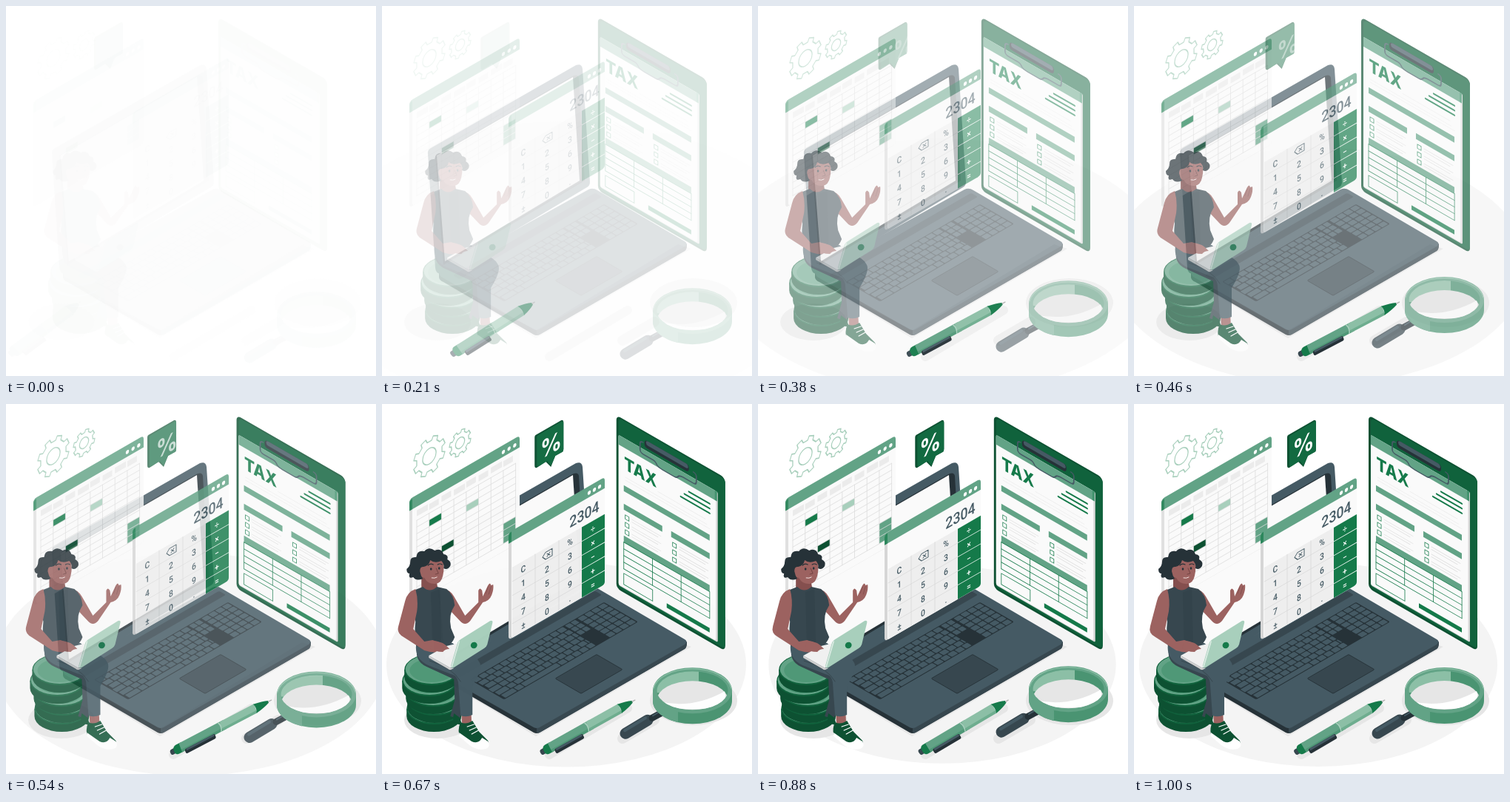
An HTML page for the animation above (1040 ms loop, 500 px wide and 500 px high).

```html
<!DOCTYPE html>
<html lang="en">
<head>
<meta charset="utf-8">
<title>Tax illustration</title>
<style>
html, body { margin: 0; width: 100%; height: 100%; overflow: hidden; background: #fff; }
svg { display: block; width: 100vw; height: 100vh; }
text { font-family: Roboto, "Liberation Sans", sans-serif; text-anchor: middle; }
.bold { font-family: Inter, "Liberation Sans", sans-serif; }
</style>
</head>
<body>
<svg id="stage" viewBox="0 0 500 500"></svg>
<script>
const GREEN = '#157a4a', PINE = '#10623c', DEEP = '#0d5132', MID = '#62a386', LIGHT = '#a8cfbc';
const SLATE = '#455a64', DARK = '#37474f', INK = '#263238', SKIN = '#9c6260';

// Markup helpers
const path = (d, fill, extra = '') => `<path d="${d}" fill="${fill}" ${extra}/>`;
const line = (d, color, w = 1) =>
  path(d, 'none', `stroke="${color}" stroke-width="${w}" stroke-linecap="round" stroke-linejoin="round"`);
const rect = (x, y, w, h, fill, r = 0, extra = '') =>
  `<rect x="${x}" y="${y}" width="${w}" height="${h}" rx="${r}" fill="${fill}" ${extra}/>`;
const oval = (x, y, rx, ry, fill, extra = '') =>
  `<ellipse cx="${x}" cy="${y}" rx="${rx}" ry="${ry}" fill="${fill}" ${extra}/>`;
const text = (x, y, s, size, fill, weight, slope) =>
  `<text class="${weight > 600 ? 'bold' : ''}" transform="matrix(.866 ${slope / 2} 0 1 ${x} ${y})" y="${size * .36}" font-size="${size}" font-weight="${weight}" fill="${fill}">${s}</text>`;
const plane = (x, y, slope, body) =>
  `<g transform="matrix(1 ${slope * .577} 0 1 ${x} ${y})">${body}</g>`;
const each = (n, f) => Array.from({ length: n }, (_, i) => f(i)).join('');

function gear(x, y, r, teeth, turn) {
  const pts = [];
  for (let i = 0; i < teeth; i++)
    for (const [a, k] of [[-.28, .8], [-.2, 1], [.2, 1], [.28, .8]]) {
      const q = (i + a) / teeth * 2 * Math.PI + turn;
      pts.push((r * k * Math.cos(q)).toFixed(1) + ' ' + (r * k * Math.sin(q)).toFixed(1));
    }
  return `<g transform="matrix(.866 -.5 0 1 ${x} ${y})">${line('M' + pts.join('L') + 'Z', LIGHT, 1.5)}
    ${oval(0, 0, r * .42, r * .42, 'none', `stroke="${LIGHT}" stroke-width="1.5"`)}</g>`;
}

function laptop() {
  const rows = each(6, r => {
    const y = 28 + r * 7.5;
    let x = 13 + r % 3, s = '';
    while (x < 136) {
      const w = r == 5 && x > 40 && x < 50 ? 48 : Math.min(x < 16 ? 8 + r * 1.6 : 8.4, 137 - x);
      s += rect(x, y, w, 6.4, SLATE, 1);
      x += w + 1.2;
    }
    if (r < 3) s += each(2, i => rect(139 + i * 7.5, y, 6.4, 6.4, SLATE, 1));
    return s + each(4, i => rect(156 + i * 9.2, y, 8, 6.4, SLATE, 1));
  });
  const deck = rect(8, 8, 192, 9, DARK, 2) + rect(12, 27, 181, 46, INK, 2) + rows +
    rect(71, 83, 56, 35, DARK, 1, `stroke="${INK}" stroke-width=".7"`);
  return path('M77 360L77 367Q78 371 83 373L205 444Q209 446 213 444L409 331Q412 329 412 322L290 255Z', INK) +
    path('M209 438L209 445L213 444L409 331Q412 329 412 321Z', DARK) +
    path('M79 359L279 248Q285 245 291 249L409 318Q414 321 409 325L213 437Q209 439 205 437L80 366Q76 362 79 359Z', SLATE) +
    `<g transform="matrix(1 -.58 1 .58 80 364)">${deck}</g>` +
    path('M62 200Q61 195 66 192L262 80Q270 77 271 85L281 238Q281 243 277 245L83 361Q73 364 72 354Z', SLATE) +
    path('M72 202L259 94Q265 92 266 97L274 236L83 350Z', INK) +
    path('M74 202L258 96L267 236L85 345Z', '#fafafa');
}

function sheet() {
  const colX = i => 9 + i * 16.7, rowY = i => 32.5 + i * 9;
  const cell = (c, r, n, fill) => rect(colX(c), rowY(r), 16.7, 9 * n, fill);
  return plane(38, 130, -1,
    rect(-1, 0, 149, 142, '#e0e0e0', 4) + rect(3, 2, 145, 140, '#fafafa', 3) +
    path('M-1 14V3Q-1 -2 4 -2H144Q148 -2 148 3V14Z', MID) + path('M-1 14V3Q-1 0 3 0V14Z', GREEN, 'opacity=".6"') +
    each(3, i => oval(126 + i * 7.7, 7.5, 2.2, 2.6, '#fff')) +
    each(8, i => rect(colX(i), 19 + i % 2, i % 3 ? 13 : 15, 8, '#ebebeb')) +
    cell(1, 1, 1, GREEN) + cell(4, 2, 1, LIGHT) + cell(2, 6, 1, DEEP) + cell(7, 8, 3, MID) +
    each(12, i => line(`M9 ${rowY(i)}H142.6`, '#dcdcdc', .7)) +
    each(9, i => line(`M${colX(i)} 32.5V131.5`, '#dcdcdc', .7)));
}

function calculator() {
  const keys = ['C', '', '%', '÷', 1, 2, 3, '×', 4, 5, 6, '−', 7, 8, 9, '+', '±', 0, '.', '='];
  const cols = [191, 223, 254, 285];
  return plane(171, 176, -1,
    rect(0, 0, 130, 143, '#d6d6d6', 4) + rect(4, 1, 126, 142, '#fafafa', 3) +
    path('M0 13V3Q0 -2 4 -2H126Q130 -2 130 3V13Z', MID) + path('M0 13V3Q0 -1 4 -1V13Z', GREEN, 'opacity=".7"') +
    each(3, i => oval(109 + i * 7, 7, 2.2, 2.6, '#fff')) +
    rect(5, 48, 94, 95, '#eeeeee') + path('M99 48H130V139Q130 143 126 143H99Z', GREEN) +
    each(4, i => line(`M5 ${67 + i * 19}H99`, '#d8d8d8', .8) + line(`M99 ${67 + i * 19}H130`, '#fff', .8)) +
    each(2, i => line(`M${36 + i * 32} 48V142`, '#d8d8d8', .8)) +
    line('M46 58L50 53.5H59V63H50ZM52 56.5L56 60.5M56 56.5L52 60.5', SLATE, 1)) +
    text(273.5, 149, '2304', 20.5, SLATE, 500, -1) +
    keys.map((k, i) => text(cols[i % 4], 176 - (cols[i % 4] - 171) * .577 + 58.5 + (i >> 2) * 19, k, 12,
      i % 4 == 3 ? '#fff' : SLATE, 500, -1)).join('');
}

function clipboard() {
  const bar = (x, y, w, h, fill) => rect(x, y, w, h, fill);
  const options = x => bar(x, 111, 52, 8, MID) + each(3, i =>
    rect(x + 2, 125 + i * 10, 5, 5.5, '#fff', 0, `stroke="${GREEN}" stroke-width=".8"`) +
    line(`M${x + 11} ${126 + i * 10}H${x + 50}M${x + 11} ${129.5 + i * 10}H${x + 46}`, '#e0e0e0', .9));
  return plane(317, 18, 1,
    rect(0, -3, 147, 234, DEEP, 6) + rect(3, -1, 144, 229, PINE, 5) +
    rect(3, 22, 134, 203, '#d9d9d9', 2) + rect(3, 22, 131.5, 202, '#fafafa', 2) +
    path('M3 22H136V35H3Z', MID) + path('M133 22H136V35H133Z', GREEN, 'opacity=".4"') +
    line('M98 44H126M92 50.5H126M87 57H126', GREEN, 2.2) +
    line('M12 74H122M12 78H126M56 68H120', '#ececec', .8) +
    bar(10, 86, 116, 8, MID) + options(10) + options(74) +
    bar(10, 154, 116, 9, MID) +
    each(5, i => line(`M10 ${163 + i * 9}H126`, GREEN, .8)) +
    each(4, i => line(`M${10 + i * 38.7} 163V199`, GREEN, .8)) +
    rect(10, 205, 39, 15, 'none', 0, `stroke="${GREEN}" stroke-width=".8"`) + bar(68, 212, 58, 6, GREEN) +
    line('M36 13Q32 13 32 17V25Q32 29 37 29H50Q53 29 55 33Q57 35 62 35H78Q82 35 84 31Q86 29 90 29H104Q108 29 108 25V18Q108 14 104 14', SLATE, 1.7) +
    rect(38, 8, 60, 10, INK, 4) + rect(40, 8, 57, 6, SLATE, 3)) +
    text(349.5, 92, 'TAX', 24, GREEN, 800, 1);
}

function coin(x, y) {
  return path(`M${x - 37} ${y}V${y + 10}A37 21 0 0 0 ${x + 37} ${y + 10}V${y}Z`, DEEP) +
    oval(x, y, 37, 21, PINE) + oval(x, y - .5, 35.5, 19.5, MID) + oval(x, y + 1, 30, 16, GREEN, 'opacity=".25"');
}

function person() {
  return coin(70, 412) + coin(71, 400) + coin(69, 388) + coin(64, 374) + coin(67, 359) +
    // legs
    path('M48 325Q42 347 60 355L97 372L98 400L92 422L105 426L115 370L100 334Z', DARK) +
    path('M97 418L105 424L108 434L99 432Q94 427 97 418Z', DEEP) +
    path('M107 415L120 415L121 432L108 434Z', SKIN) +
    path('M46 324Q43 344 62 353L98 367Q103 371 103 380L106 421Q114 424 122 420L122 381Q136 358 132 350Q127 339 112 337L95 323Z', SLATE) +
    line('M64 347Q95 356 106 375', DARK, 1) +
    // shoe
    path('M106 430Q113 434 122 428L131 443L143 455Q145 461 140 464Q129 468 120 460L104 446Q102 438 106 430Z', DEEP) +
    path('M104 444L121 456Q130 460 135 451L143 456Q147 463 140 466Q129 469 118 461L104 449Z', '#fff') +
    line('M115 436L124 433M118 441L127 437M121 446L130 441', '#fff', 1.3) +
    // raised arm
    path('M83 250Q92 251 97 260L112 286L130 268L130 252Q132 247 135 252L136 260L143 245Q146 240 147 245L150 244Q151 250 148 258Q145 266 136 268L119 293Q112 301 105 293L88 275Z', SKIN) +
    line('M143 247L140 256M147 247L144 257', '#7b4a49', .7) +
    // neck, body
    path('M53 228L53 250Q61 261 75 249L73 236Z', '#854f4e') +
    path('M45 251L55 247Q64 256 74 247L87 250Q97 258 98 272Q89 285 93 303L98 315Q92 332 68 333L46 327Q43 310 45 294Q38 272 45 251Z', DARK) +
    path('M66 254L78 250L80 331L68 333Z', INK, 'opacity=".18"') +
    // head
    path('M53 220Q58 213 62 207Q72 213 81 209Q85 219 82 232Q80 242 72 243Q62 244 57 235Q49 233 50 226Q50 221 53 220Z', SKIN) +
    path('M33 223Q38 219 38 213Q38 206 46 207Q47 197 57 199Q63 192 71 198Q80 194 83 203Q90 204 88 210Q94 213 92 219Q88 225 83 222Q84 216 80 212Q71 216 65 211Q63 219 56 220Q51 219 51 226Q52 232 55 236Q46 240 42 234Q35 237 37 229Q33 229 33 223Z', INK) +
    oval(66, 223, 1.3, 1.7, INK) + oval(77, 222, 1.3, 1.7, INK) +
    line('M62 218Q65 215 69 217M75 217Q78 215 81 217', INK, 1.2) +
    line('M73 222L76 229L72 230', '#6f403f', .9) + line('M67 235Q71 236 74 234', '#f3e4e2', 1) +
    // near arm
    path('M45 250Q34 254 31 266L22 300Q19 310 29 315L57 333Q72 338 84 334L91 331L83 324L68 319L57 321L42 304L47 280Q49 264 45 250Z', SKIN) +
    line('M70 328L82 331M73 324L86 328', '#7b4a49', .7) +
    // small computer
    path('M63 340L91 356L97 357L93 359Q91 360 89 358L63 343Z', '#cfcfcf') +
    path('M63 340L87 327L109 322L96 356L91 356Z', '#f0f0f0') +
    path('M106 318L146 293Q150 292 149 296L142 325Q141 328 138 330L97 356Q92 358 93 353L102 322Q103 320 106 318Z', LIGHT) +
    line('M104 321L94 355', '#dcece4', 1.6) +
    oval(124, 326, 4.5, 4.2, GREEN, 'transform="rotate(-30 124 326)"') +
    path('M68 320Q82 320 91 331Q85 331 82 335Q71 335 65 330Z', SKIN);
}

function pen() {
  return `<g transform="translate(218 471) rotate(-30.4)">` +
    rect(-1, -4, 14, 8, DARK, 3) + rect(4, -7, 15, 14, GREEN, 5) +
    path('M13 -7H75V7H13Z', MID) + path('M70 -7H118V7H70Z', '#8cbfa6') +
    path('M13 3H118V7H13Z', GREEN, 'opacity=".25"') + line('M68 -6.5Q71 0 68 6.5', LIGHT, 1.6) +
    path('M117 -7Q129 -5 136 -1.5V1.5Q129 5 117 7Q120 0 117 -7Z', GREEN) +
    line('M136 0H140', '#b0b0b0', 1.4) + rect(17, 5, 42, 7, INK, 2) + rect(19, 5, 39, 3, SLATE, 1) + '</g>';
}

function magnifier() {
  return line('M329 445L359 427', DARK, 15) + line('M328 441L356 424', SLATE, 4) +
    line('M365 424L378 417', INK, 9) + line('M366 421L376 415', SLATE, 2) +
    path('M366 387V401A53.5 31 0 0 0 473 401V387Z', '#4a9472') +
    path('M366 387V401A53.5 31 0 0 0 400 430V416Z', MID) +
    oval(419.5, 387, 53.5, 31, MID) +
    oval(419.5, 387, 48, 26, '#4a9472') +
    `<clipPath id="hole">${oval(419.5, 387, 48, 26, '#000')}</clipPath><g clip-path="url(#hole)">` +
    path('M371 360H428V390H371Z', '#8cbfa6') +
    oval(419.5, 400, 48, 26, '#e6e6e6') +
    path('M376 402Q420 412 463 388Q468 400 450 412H392Z', '#fff') + '</g>' +
    line('M367 384A53 30.5 0 0 1 472 384', '#8cbfa6', 1.2);
}

const shadows =
  oval(75, 427, 45, 25, '#e6e6e6') + oval(421, 401, 59, 33, '#e6e6e6') +
  line('M325 452L368 427', '#e6e6e6', 14) + line('M226 474L332 411', '#e6e6e6', 12) +
  path('M85 375L208 449L418 328L400 322L209 438Z', '#e6e6e6');
const badge = path('M207 45Q207 42 210 41L243 22Q246 21 246 25V61Q246 64 244 65L235 70L229 85L222 78L210 86Q207 87 207 83Z', DEEP) +
  path('M210 45Q210 43 212 42L243 24Q246 22 246 25V61Q246 64 244 65L235 70L229 83L224 77L213 84Q210 85 210 82Z', '#126a41');

const parts = {
  floor: oval(249, 352, 242, 138, '#f4f4f4'), shadows,
  gears: gear(64, 70.5, 25, 8, .4) + gear(105.5, 52.5, 17, 8, .3),
  laptop: laptop(), sheet: sheet(), clipboard: clipboard(), badge,
  percent: text(229, 55, '%', 33, '#fff', 700, -1),
  calculator: calculator(), person: person(), pen: pen(), magnifier: magnifier()
};
stage.innerHTML = Object.entries(parts).map(([k, v]) => `<g data-part="${k}">${v}</g>`).join('');
const nodes = {};
for (const k in parts) nodes[k] = stage.querySelector(`[data-part=${k}]`);

// cubic-bezier(.36, -.01, .5, 1.38): overshoots before settling
function ease(x) {
  if (x <= 0) return 0;
  if (x >= 1) return 1;
  const curve = (s, a, b) => 3 * a * s * (1 - s) ** 2 + 3 * b * s * s * (1 - s) + s ** 3;
  let lo = 0, hi = 1;
  for (let i = 0; i < 24; i++) {
    const m = (lo + hi) / 2;
    curve(m, .36, .5) < x ? lo = m : hi = m;
  }
  return curve(lo, -.01, 1.38);
}

const move = (x, y) => `translate(${x} ${y})`;

function penPose(p) {
  const slide = -225 * (1 - ease(p / .6));
  const skew = p < .6 ? 20 - 30 * ease(p / .6)
    : p < .8 ? -10 + 12 * ease((p - .6) / .2)
    : 2 - 2 * ease((p - .8) / .2);
  return `${move(278 + slide, 437)} skewX(${skew}) ${move(-278, -437)}`;
}

function draw() {
  const p = Math.min(1, performance.now() % 1040 / 1000);
  const e = ease(p), rest = 1 - e;
  const pose = {
    floor: `${move(249, 352)} scale(${1 + rest / 2}) ${move(-249, -352)}`,
    clipboard: move(-30 * rest, 0),
    badge: move(-88 * rest, 0),
    percent: move(-64 * rest, 0),
    calculator: move(0, -30 * rest),
    person: move(30 * rest, 0),
    pen: penPose(p),
    magnifier: move(0, 30 * rest)
  };
  // the badge fades inside a fading group
  const fade = { pen: ease(p / .6), badge: e * e, percent: e * e };
  for (const k in nodes) {
    nodes[k].setAttribute('opacity', Math.min(1, Math.max(.012, fade[k] ?? e)));
    if (pose[k]) nodes[k].setAttribute('transform', pose[k]);
  }
  requestAnimationFrame(draw);
}
draw();
</script>
</body>
</html>
```
